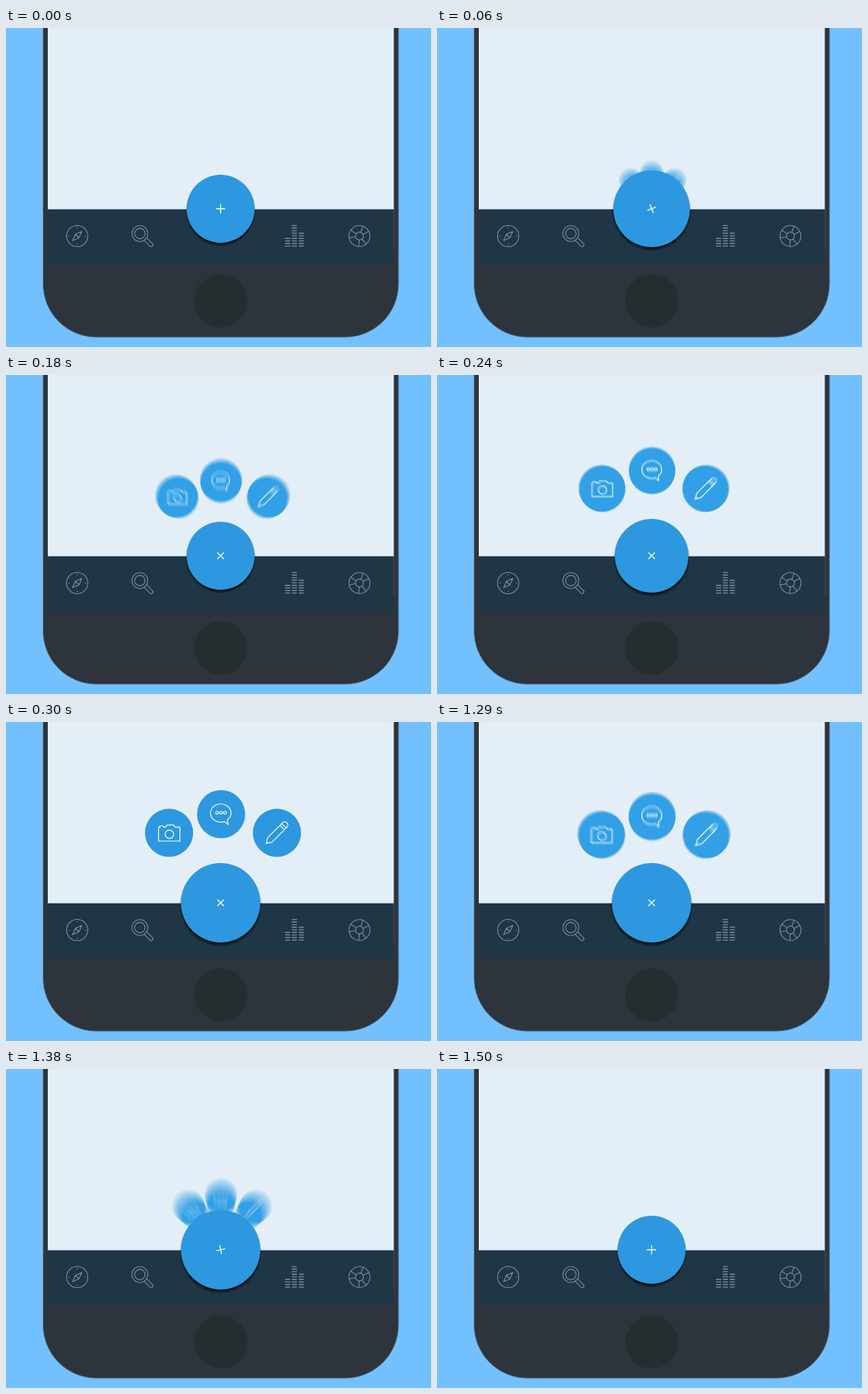
An HTML page that plays this animation: 600 by 450 pixels, repeating every 2.85 s.

```html
<!DOCTYPE html>
<html lang="en">
<head>
<meta charset="utf-8">
<title>Expanding action button</title>
<style>
  html, body { margin: 0; width: 100%; height: 100%; overflow: hidden; background: #73c0ff; }
  svg { display: block; width: 600px; height: 450px; }
  .line { fill: none; stroke-linejoin: round; }
  .nav { stroke: #82919b; stroke-width: 1.1; }
  .white { stroke: #fff; stroke-width: 1.2; }
  .blur { isolation: isolate; }
  .blur use { mix-blend-mode: plus-lighter; }
</style>
</head>
<body>
<svg viewBox="0 0 600 450">
  <defs>
    <filter id="soft" x="-20%" y="-20%" width="140%" height="140%">
      <feGaussianBlur stdDeviation="1.3"/>
    </filter>
    <g id="camera">
      <circle r="34" fill="#2d98df"/>
      <g class="line white">
        <path d="M-14.8-8H-13V-9.8H-8V-8H-5L-3-11H6.5L8.5-8H15.3V11.7H-14.8Z"/>
        <circle cx=".5" cy="2" r="6"/>
      </g>
    </g>
    <g id="chat">
      <circle r="34" fill="#2d98df"/>
      <g class="line white">
        <path d="M4.5 10.4A14.5 12.8 0 1 1 8.8 8.2L9.8 14.6Z"/>
        <circle cx="-5.5" cy="-2" r="2"/>
        <circle cy="-2" r="2"/>
        <circle cx="5.5" cy="-2" r="2"/>
      </g>
    </g>
    <g id="pencil">
      <circle r="34" fill="#2d98df"/>
      <g class="line white" transform="rotate(-45)">
        <path d="M-14-4.4H15.5A4.4 4.4 0 0 1 15.5 4.4H-14L-21.5 0ZM10.5-4.4V4.4M14-4.4V4.4M-19-1.5V1.5"/>
      </g>
    </g>
  </defs>

  <rect width="600" height="450" fill="#73c0ff"/>
  <rect x="52.5" y="-100" width="501.5" height="536" rx="75" fill="#2d343c" stroke="#52606d"/>
  <rect x="59" width="488.5" height="256" fill="#e4eef7"/>
  <rect x="59" y="255.7" width="488.5" height="77.3" fill="#1f3646"/>
  <path d="M548 256V312" stroke="#44515d"/>
  <circle cx="303.3" cy="385" r="37.5" fill="#262d30"/>

  <g class="line nav">
    <g transform="translate(100.5 293.5)">
      <circle r="15"/>
      <path d="M6.5-6.5L2.5 2.5L-6.5 6.5L-2.5-2.5ZM-2.5-2.5L2.5 2.5M0-12.5V-11M0 12.5V11M-12.5 0H-11M12.5 0H11"/>
    </g>
    <g transform="translate(189 290) rotate(45)">
      <circle r="11.2"/>
      <circle r="7.4"/>
      <path d="M10.9-2.5H22.5A2.5 2.5 0 0 1 22.5 2.5H10.9"/>
    </g>
    <path id="bars" stroke-width="1.4"/>
    <g transform="translate(499 293.5)">
      <circle r="14.8"/>
      <circle r="5.6"/>
      <path id="spokes"/>
    </g>
  </g>

  <g id="items"></g>

  <g transform="translate(303 255)">
    <g id="button">
      <circle cy="3.4" r="47.6" fill="#030a10" opacity=".9" filter="url(#soft)"/>
      <circle r="48" fill="#2d98df"/>
    </g>
    <path id="plus" class="line" stroke="#fff" stroke-width="1.4" d="M-6.4 0H6.4M0-6.4V6.4"/>
  </g>
</svg>
<script>
const LOOP = 2850, STEP = 30, SHUTTER = 20, COPIES = 10;
const HOME = { x: 303, y: 255 };
const $ = id => document.getElementById(id);
const clamp = v => Math.max(0, Math.min(1, v));
const span = (t, a, b) => clamp((t - a) / (b - a));
const wave = u => (1 - Math.cos(Math.PI * u)) / 2;

// Equalizer bars: [left, number of rows]
$("bars").setAttribute("d", [[394, 4], [403.5, 9], [413.3, 6]].map(([x, rows]) =>
  Array.from({ length: rows }, (_, i) => `M${x} ${307.6 - i * 3.62}h7.2`).join("")).join(""));

$("spokes").setAttribute("d", [-70, -26, 50, 94, 170, 214].map(deg => {
  const a = deg * Math.PI / 180, c = Math.cos(a), s = Math.sin(a);
  return `M${5.6 * c} ${5.6 * s}L${14.8 * c} ${14.8 * s}`;
}).join(""));

const items = [
  { id: "camera", x: 230.2, y: 156.3 },
  { id: "pencil", x: 382.5, y: 156.3 },
  { id: "chat", x: 303.7, y: 130 }
].map(item => {
  const ns = "http://www.w3.org/2000/svg";
  const group = document.createElementNS(ns, "g");
  group.setAttribute("class", "blur");
  const copies = Array.from({ length: COPIES }, () => {
    const use = document.createElementNS(ns, "use");
    use.setAttribute("href", "#" + item.id);
    return group.appendChild(use);
  });
  $("items").appendChild(group);
  return { ...item, copies };
});

// How far the items are out: 0 hidden, 1 in place
function reach(t) {
  return t < 800
    ? 1 - (1 - span(t, 0, 300)) ** 2
    : 1 - span(t, 1260, 1440) ** 2;
}

function radius(t) {
  if (t < 180) return 48 + 8 * wave(t / 90);
  if (t < 800) return 48 + 8 * wave(span(t, 180, 300));
  return 56 - 8 * wave(span(t, 1380, 1500));
}

function angle(t) {
  return t < 800 ? -45 * span(t, 0, 120) : -45 * (1 - span(t, 1290, 1413));
}

function place(use, item, p, opacity) {
  const x = HOME.x + (item.x - HOME.x) * p;
  const y = HOME.y + (item.y - HOME.y) * p;
  use.setAttribute("transform", `translate(${x} ${y}) scale(${0.15 + 0.85 * p})`);
  use.setAttribute("opacity", opacity);
}

function draw(t) {
  const moving = Math.abs(reach(t + SHUTTER / 2) - reach(t - SHUTTER / 2)) > 0.003;
  for (const item of items) {
    item.copies.forEach((use, i) => {
      const shift = moving ? (i / (COPIES - 1) - 0.5) * SHUTTER : 0;
      place(use, item, reach(t + shift), moving ? 1 / COPIES : i ? 0 : 1);
    });
  }
  $("items").setAttribute("visibility", reach(t) > 0 ? "visible" : "hidden");
  $("button").setAttribute("transform", `scale(${radius(t) / 48})`);
  $("plus").setAttribute("transform", `rotate(${angle(t)})`);
}

const start = performance.now();
function tick() {
  const t = (performance.now() - start) % LOOP;
  draw(Math.floor(t / STEP) * STEP);
  requestAnimationFrame(tick);
}
tick();
</script>
</body>
</html>
```
